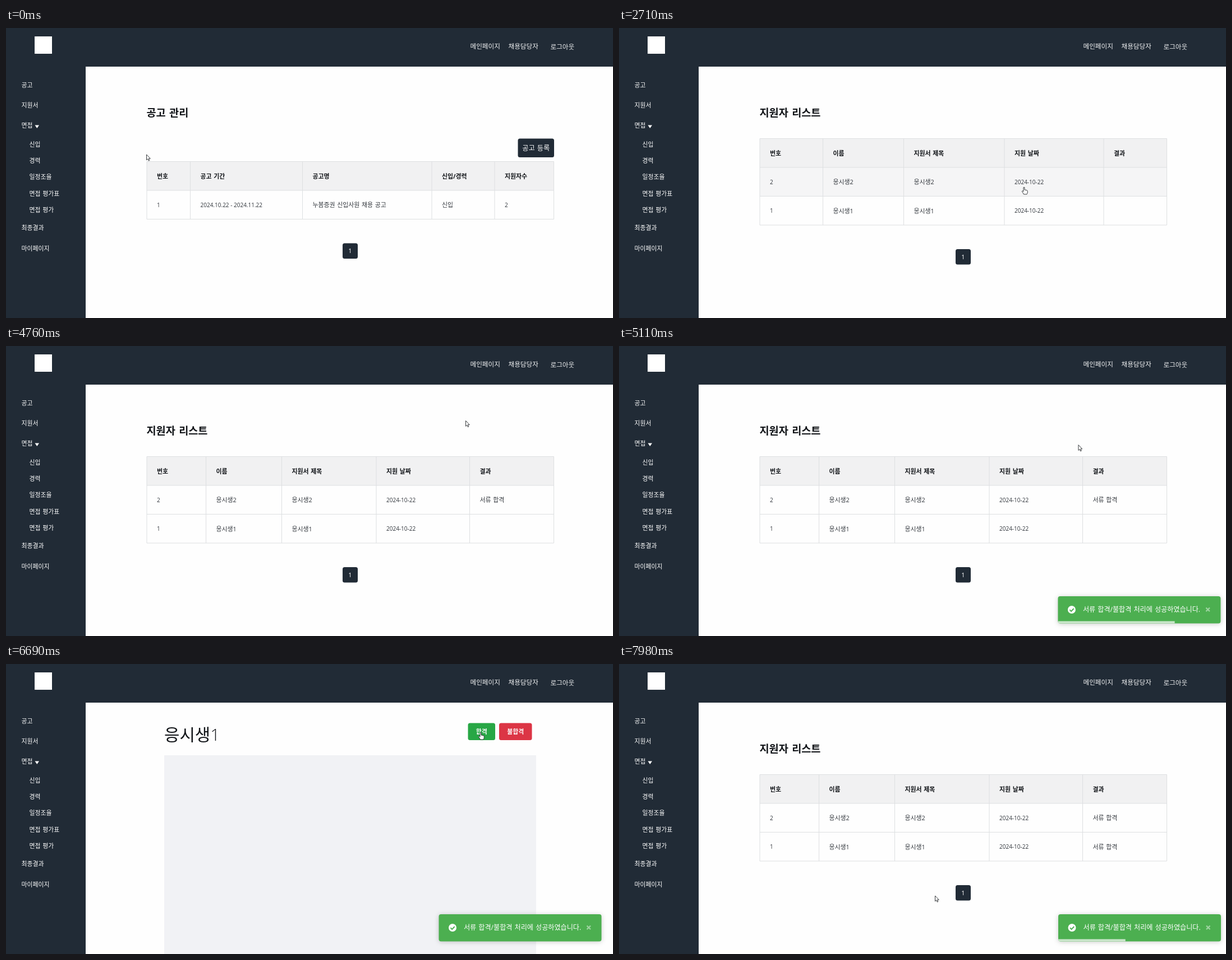
Recreate the animation shown at these times as an HTML page. Size 1082 by 518 pixels, loop 8 s.

```html
<!DOCTYPE html>
<html lang="ko">
<head>
<meta charset="utf-8">
<title>채용 관리</title>
<style>
  html, body { margin: 0; width: 100%; height: 100%; overflow: hidden; background: #fefefe; }
  svg { display: block; }
  text { font-family: "Open Sans", "Noto Sans CJK KR", "Noto Sans CJK", sans-serif; word-spacing: .08em; white-space: pre; }
  .num { word-spacing: 0; }
  .toast { filter: drop-shadow(0 1px 4px rgba(0, 0, 0, .2)); }
</style>
</head>
<body>
<script>
const LOOP = 8000;
const DARK = '#212b36', INK = '#111418', BODY = '#30353b', LINE = '#dddfe1';
const NS = 'http://www.w3.org/2000/svg';

function el(parent, tag, attrs = {}, content) {
  const node = document.createElementNS(NS, tag);
  for (const key in attrs) node.setAttribute(key, attrs[key]);
  if (content !== undefined) node.textContent = content;
  parent.append(node);
  return node;
}
const group = (parent, attrs) => el(parent, 'g', attrs);
const rect = (parent, x, y, width, height, fill, rx = 0) =>
  el(parent, 'rect', { x, y, width, height, fill, rx });

// Text placed by its left edge and vertical middle.
function label(parent, x, cy, str, size, fill, more = {}) {
  return el(parent, 'text', { x, y: cy + size * .37, 'font-size': size, fill, ...more }, str);
}
function button(parent, x, y, w, h, fill, str, size, weight = 400) {
  rect(parent, x, y, w, h, fill, 3.5);
  label(parent, x + w / 2, y + h / 2, str, size, '#fff', { 'text-anchor': 'middle', 'font-weight': weight });
}

const svg = el(document.body, 'svg', { width: 1082, height: 518, viewBox: '0 0 1082 518' });
rect(svg, 0, 0, 1082, 518, '#fefefe');
const pages = group(svg);

// Fixed frame: header and sidebar
rect(svg, 0, 0, 1082, 69, DARK);
rect(svg, 0, 0, 142, 518, DARK);
rect(svg, 51, 15, 31, 31, '#fff');

const nav = group(svg);
[[828, '메인페이지', 32.5], [896, '채용담당자', 32.5], [971, '로그아웃', 33.5]]
  .forEach(([x, str, y]) => label(nav, x - .5, y, str, 11.6, '#f2f3f4'));

[[28, 102, '공고'], [28, 138, '지원서'], [28, 174, '면접'],
 [42, 207.5, '신입'], [42, 236.5, '경력'], [42, 266, '일정조율'], [42, 295.5, '면접 평가표'], [42, 325, '면접 평가'],
 [28, 357, '최종결과'], [28, 394, '마이페이지']]
  .forEach(([x, y, str]) => label(svg, x - .5, y, str, 10.9, '#fff', { 'font-weight': 500 }));
el(svg, 'path', { d: 'M51.5 173.5h7.5l-3.75 5.5z', fill: '#fff' });

function tablePage({ title, cols, top, head, rows, pager, add, hover }) {
  const g = group(pages), left = cols[0], right = cols[cols.length - 1];
  const rowY = i => top + 51.5 * i;
  const bottom = rowY(rows.length + 1);
  label(g, left - .5, 151.5, title, 18.6, INK, { 'font-weight': 700 });
  if (add) button(g, 912.5, 197.5, 64.5, 33.5, DARK, '공고 등록', 12.2);
  rect(g, left, top, right - left, 51.5, '#f1f1f2');
  const shade = rect(g, left, 0, right - left, 51.5, '#f5f5f6');
  [head, ...rows].forEach((row, r) => row.forEach((str, c) => {
    const numeric = /^[\d. -]+$/.test(str);
    label(g, cols[c] + 18, rowY(r) + 26, str, numeric ? 10 : 10.9, r ? BODY : INK,
      { 'font-weight': r ? 400 : 700, class: numeric ? 'num' : '' });
  }));
  let d = cols.map(x => `M${x} ${top}V${bottom}`).join('');
  for (let i = 0; i <= rows.length + 1; i++) d += `M${left} ${rowY(i)}H${right}`;
  el(g, 'path', { d, stroke: LINE, fill: 'none' });
  button(g, pager[0], pager[1], 27, 27.5, DARK, '1', 11);

  const rowAt = (x, y) => {
    const i = Math.floor((y - top) / 51.5);
    return x > left && x < right && i > 0 && i <= rows.length ? i : 0;
  };
  return {
    g,
    hit: (x, y) => rowAt(x, y) > 0,
    update(x, y) {
      const i = hover ? rowAt(x, y) : 0;
      shade.setAttribute('y', rowY(i));
      shade.setAttribute('display', i ? 'inline' : 'none');
    }
  };
}

const JOB_HEAD = ['번호', '공고 기간', '공고명', '신입/경력', '지원자수'];
const JOB_ROWS = [['1', '2024.10.22 - 2024.11.22', '누봄증권 신입사원 채용 공고', '신입', '2']];
const PEOPLE = ['응시생1', '응시생2'];

function peoplePage(cols, results, hover) {
  return tablePage({
    title: '지원자 리스트', cols, top: 197.5, hover, pager: [600, 395],
    head: ['번호', '이름', '지원서 제목', '지원 날짜', '결과'],
    rows: [1, 0].map(i => [String(i + 1), PEOPLE[i], PEOPLE[i], '2024-10-22', results[i]])
  });
}

// Application form; once loaded it grows past the bottom of the stage.
function formPage(name, loaded) {
  const g = group(pages);
  const left = loaded ? 282 : 284, right = loaded ? 945 : 956;
  label(g, left, 126, name, 29.8, INK, { 'font-weight': 300 });
  button(g, right - 121.5, 105.5, 48.5, 30.5, '#28a745', '합격', 10.9, 700);
  button(g, right - 66, 105.5, 58.5, 30.5, '#dc3545', '불합격', 10.9, 700);
  rect(g, left, 163, right - left, loaded ? 355 : 128.5, '#f1f2f5');
  return {
    g,
    hit: (x, y) => x > right - 121 && x < right - 8 && y > 105 && y < 136,
    update() {}
  };
}

const PASS = '서류 합격';
const COLS = [251, 363.5, 507.5, 687, 864, 976.5];
const COLS_PASS = [251, 356.5, 491.5, 660, 826.5, 976.5];

// start time, page, wide layout (no scrollbar)
const scenes = [
  [0, tablePage({ title: '공고 관리', cols: [251, 328.5, 528.5, 759, 871, 976.5], top: 238.5,
    head: JOB_HEAD, rows: JOB_ROWS, pager: [600, 384.5], add: true }), false],
  [1270, tablePage({ title: '지원서 관리', cols: [252, 331, 533.5, 767, 880.5, 987.5], top: 197.5,
    head: JOB_HEAD, rows: JOB_ROWS, pager: [606, 343.5], hover: true }), true],
  [2300, peoplePage(COLS, ['', ''], true), false],
  [3420, formPage(PEOPLE[1], false), true],
  [3620, formPage(PEOPLE[1], true), false],
  [4400, peoplePage(COLS_PASS, ['', PASS], true), false],
  [5450, formPage(PEOPLE[1], false), true],
  [5940, formPage(PEOPLE[0], true), false],
  [6770, peoplePage(COLS_PASS, [PASS, PASS], false), false]
];

// Toast
const TOAST_W = 290, BOUNCE = 495, BAR_TIME = 2122;
const toasts = [{ enter: 4640, bar: 4512 }, { enter: 6779, bar: 6735 }];
const toast = group(svg, { class: 'toast' });
const clip = el(el(svg, 'defs'), 'clipPath', { id: 'round' });
rect(clip, 0, 447, TOAST_W, 48.5, '#000', 4);
rect(toast, 0, 447, TOAST_W, 48.5, '#4caf50', 4);
el(toast, 'circle', { cx: 24.5, cy: 471, r: 7, fill: '#fff' });
el(toast, 'path', { d: 'M21 471.2l2.6 2.6 4.6-4.8', stroke: '#4caf50', 'stroke-width': 1.9, fill: 'none' });
label(toast, 44.5, 470.5, '서류 합격/불합격 처리에 성공하였습니다.', 12.1, '#fff');
el(toast, 'path', { d: 'M264 467.5l6.5 6.5m0-6.5l-6.5 6.5', stroke: '#fff', 'stroke-width': 2.4, opacity: .45 });
const bar = rect(group(toast, { 'clip-path': 'url(#round)' }), 0, 491.5, TOAST_W, 4, 'rgba(255,255,255,.7)');

const ENTER = [[0, 3000], [.6, -25], [.75, 10], [.9, -5], [1, 0]];
const LEAVE = [[0, 0], [.2, -20], [1, 2000]];
const easeOut = u => 1 - (1 - u) ** 3;
const easeInOut = u => u * u * (3 - 2 * u);

// Interpolates rows of [time, ...values].
function along(steps, t, ease) {
  const i = steps.findIndex(s => s[0] > t);
  if (i < 0) return steps[steps.length - 1].slice(1);
  const a = steps[i - 1], b = steps[i];
  const u = ease((t - a[0]) / (b[0] - a[0]));
  return a.slice(1).map((v, k) => v + (b[k + 1] - v) * u);
}

function drawToast(t, shift) {
  const now = toasts.find(o => t >= o.enter && t < o.bar + BAR_TIME + BOUNCE * .35);
  toast.setAttribute('display', now ? 'inline' : 'none');
  if (!now) return;
  const gone = t - now.bar - BAR_TIME;
  const [dx] = gone > 0
    ? along(LEAVE, gone / BOUNCE, u => u)
    : along(ENTER, (t - now.enter) / BOUNCE, easeOut);
  toast.setAttribute('transform', `translate(${783 + shift + dx} 0)`);
  bar.setAttribute('width', TOAST_W * Math.max(0, -gone / BAR_TIME));
}

// Pointer
const path = [
  [0, 250.5, 226], [320, 250.5, 226], [800, 68, 145], [1630, 68, 145], [1940, 722, 284],
  [2720, 722, 284], [3060, 809, 281], [3270, 813, 291], [3660, 813, 291], [4150, 846, 122],
  [4400, 846, 122], [4760, 819.5, 133.5], [5050, 819, 160], [5350, 818.3, 315.5], [5970, 818.3, 315.5],
  [6450, 846, 122], [6800, 846, 122], [7150, 738, 284.5], [7300, 735, 290], [7620, 640, 360],
  [7980, 563.5, 414], [LOOP, 563.5, 414]
];
const cursor = group(svg, { 'stroke-linejoin': 'round', fill: '#fff', stroke: '#23262a', 'stroke-width': .9 });
const arrow = el(cursor, 'path', { d: 'M0 0V9.8L2.2 7.8 3.8 11.2 5.3 10.5 3.8 7.2H6.8Z' });
const hand = el(cursor, 'path', {
  d: 'M-1 1Q0 -.6 1 1V5L5 5.8Q6.3 6.2 6.2 7.5V10Q5.8 11.5 5 13H-.6Q-1.3 11-3.2 8.8-4.2 7.2-3 6.8-2 6.8-1 8.2Z'
});

const inMenu = (x, y) => x > 24 && x < 80 && y > 126 && y < 152;
const show = (node, on) => node.setAttribute('display', on ? 'inline' : 'none');

function draw(t) {
  const scene = scenes.filter(s => s[0] <= t).pop();
  const [, page, wide] = scene;
  const shift = wide ? 12 : 0;
  scenes.forEach(s => show(s[1].g, s === scene));
  nav.setAttribute('transform', `translate(${shift} 0)`);

  const [x, y] = along(path, t, easeInOut);
  page.update(x, y);
  const pointing = inMenu(x, y) || page.hit(x, y);
  show(hand, pointing);
  show(arrow, !pointing);
  cursor.setAttribute('transform', `translate(${x} ${y})`);
  drawToast(t, shift);
}

const start = performance.now();
function tick() {
  draw((performance.now() - start) % LOOP);
  requestAnimationFrame(tick);
}
draw(0);
requestAnimationFrame(tick);
</script>
</body>
</html>
```
